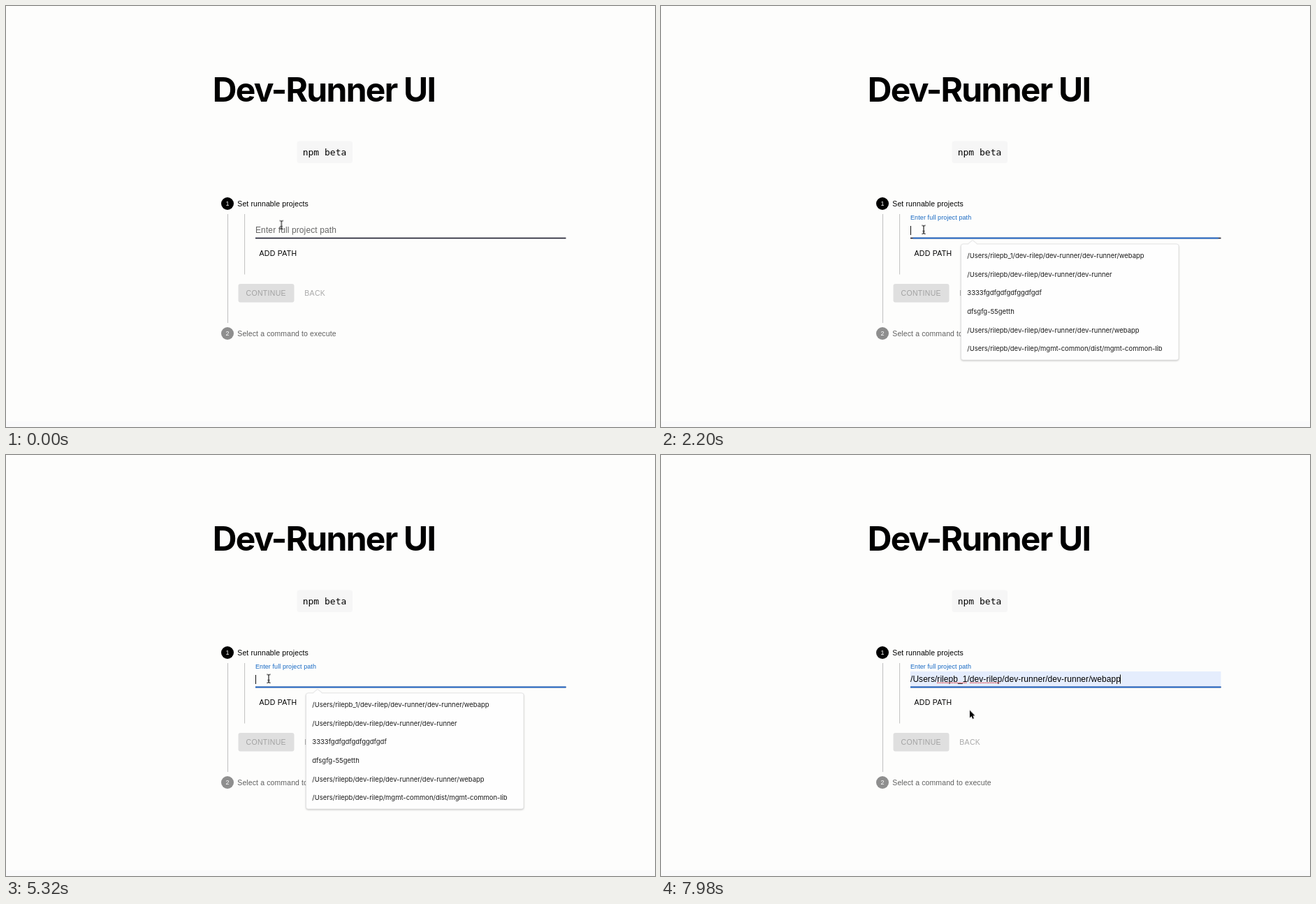
An HTML page that plays this animation: 929 px wide and 603 px high, repeating every 8000 ms.

```html
<!DOCTYPE html>
<html lang="en">
<head>
<meta charset="utf-8">
<title>Dev-Runner UI</title>
<style>
  html, body { margin: 0; width: 100%; height: 100%; overflow: hidden; background: #fdfdfc; }
  svg { display: block; width: 929px; height: 603px; }
  text { font-family: "Liberation Sans", Arial, sans-serif; white-space: pre; }

  .title { font: 700 48px Inter, sans-serif; letter-spacing: -.036em; text-anchor: middle; }
  .chip { font: 13px "DejaVu Sans Mono", monospace; text-anchor: middle; }
  .step { font-size: 10.5px; letter-spacing: .01071em; }
  .badge { font-size: 9px; fill: #fff; text-anchor: middle; }
  .button { font-size: 10.5px; letter-spacing: .02857em; }
  .label { font-size: 12px; letter-spacing: .00938em; }
  .value { font-size: 12px; letter-spacing: .05px; }
  .system text, text.system { font-family: Inter, sans-serif; font-size: 9.5px; letter-spacing: -.03px; fill: #1c1c1c; }
  text.preview { font-size: 9.3px; fill: #000; }
  .rail { stroke: #b9b9b9; stroke-width: .9; }
  .muted { fill: #a9a9a9; }
  .caret { fill: #111; }
  .typo { stroke: #e0444a; stroke-width: 1.3; stroke-dasharray: 1.5 .9; }

  /* One shared 8 s clock */
  .label, .focus, .pointer { animation: 8s linear infinite; }
  .popup, .hover, .blink, .filled, .done, .ibeam, .arrow { animation: 8s step-end infinite; }
  .label { animation-name: float; }
  .focus { animation-name: spread; transform-origin: 579.2px 0; }
  .pointer { animation-name: move; }
  .popup { animation-name: popup; }
  .hover { animation-name: hover; }
  .blink { animation-name: blink; }
  .filled { animation-name: filled; }
  .done { animation-name: done; }
  .ibeam { animation-name: ibeam; }
  .arrow { animation-name: arrow; }

  @keyframes float {
    0%, 22.249% { transform: translate(357px, 324.7px) scale(1); fill: #666; }
    22.25% { transform: translate(357px, 319.6px) scale(.933); fill: #626972;
             animation-timing-function: cubic-bezier(.131, .404, .423, 1); }
    28.725%, 100% { transform: translate(357px, 305.8px) scale(.75); fill: #1769c4; }
  }
  @keyframes spread {
    0%, 22.249% { transform: scaleX(0); }
    22.25% { transform: scaleX(.268); animation-timing-function: cubic-bezier(.131, .404, .423, 1); }
    28.725%, 100% { transform: scaleX(1); }
  }
  @keyframes move {
    0%, 2.125% { transform: translate(394.3px, 313.5px); animation-timing-function: ease-out; }
    5.375%, 8.74% { transform: translate(377px, 319.5px); }
    8.75%, 68.5% { transform: translate(376px, 320.3px); animation-timing-function: ease-in-out; }
    74.75% { transform: translate(424.8px, 355.6px); }
    77%, 78.25% { transform: translate(427px, 357.5px); animation-timing-function: ease-out; }
    82%, 92% { transform: translate(438.7px, 365.8px); animation-timing-function: ease-out; }
    94%, 100% { transform: translate(442px, 365.8px); }
  }
  @keyframes popup { 0% { opacity: 0 } 22.25% { opacity: 1 } 92.5%, 100% { opacity: 0 } }
  @keyframes hover { 0% { opacity: 0 } 79.25% { opacity: 1 } 92.5%, 100% { opacity: 0 } }
  @keyframes filled { 0% { opacity: 0 } 79.25%, 100% { opacity: 1 } }
  @keyframes done { 0% { opacity: 0 } 92.5%, 100% { opacity: 1 } }
  @keyframes blink {
    0% { opacity: 0 } 22.25% { opacity: 1 } 39.5% { opacity: 0 }
    57.25% { opacity: 1 } 74.5%, 100% { opacity: 0 }
  }
  @keyframes ibeam { 0% { opacity: 1 } 71.25%, 100% { opacity: 0 } }
  @keyframes arrow { 0% { opacity: 0 } 71.25%, 100% { opacity: 1 } }
</style>
</head>
<body>
<svg viewBox="0 0 929 603">
  <rect width="929" height="603" fill="#fdfdfc"/>
  <rect y="595" width="929" height="8" fill="#fafafb"/>

  <text class="title" x="455" y="137.3">Dev-Runner UI</text>
  <rect x="416.5" y="193.5" width="79.5" height="31.5" rx="3.5" fill="#f6f6f6"/>
  <text class="chip" x="456" y="214">npm beta</text>

  <circle cx="317" cy="283" r="9"/>
  <text class="badge" x="317" y="286.2">1</text>
  <text class="step" x="331.3" y="286.8">Set runnable projects</text>
  <path class="rail" d="M317.5 298V454M341.6 298V384.5"/>
  <circle cx="317" cy="469" r="9" fill="#8e8e8e"/>
  <text class="badge" x="317" y="472.2">2</text>
  <text class="step" x="331.3" y="472.7" fill="#606060">Select a command to execute</text>

  <rect class="filled" x="357" y="310" width="444.5" height="22" fill="#e5edfd"/>
  <rect x="357" y="331.7" width="444.5" height="1.6" fill="#1b1b2b"/>
  <rect class="focus" x="357" y="331.7" width="444.5" height="1.6" fill="#1967d2"/>
  <text class="label">Enter full project path</text>
  <rect class="caret blink" x="357" y="315" width="1" height="13"/>
  <text class="system preview hover" x="356.8" y="324.6">/Users/rilepb_1/dev-rilep/dev-runner/dev-runner/webapp</text>
  <g class="done">
    <text class="value" x="357" y="324.7">/Users/rilepb_1/dev-rilep/dev-runner/dev-runner/webapp</text>
    <path class="typo" d="M395 326.4H437.5M442 326.4H485.5"/>
    <rect class="caret" x="657" y="314.5" width="1" height="13"/>
  </g>

  <text class="button" x="362.5" y="357.8">ADD PATH</text>
  <rect x="332.5" y="398" width="80" height="26.5" rx="3" fill="#dfdfdf"/>
  <text class="button" x="343.6" y="414.9" fill="#a2a2a2">CONTINUE</text>
  <text class="button muted" x="427.3" y="414.9">BACK</text>

  <g class="popup">
    <path d="M432.5 341H439.5L446 335.5L452.5 341H738Q741 341 741 344V504Q741 507 738 507H432.5Q429.5 507 429.5 504V344Q429.5 341 432.5 341Z"
          fill="#fefefe" stroke="#dedede" stroke-width=".7" style="filter: drop-shadow(0 1px 1.3px rgba(0,0,0,.22))"/>
    <rect class="hover" x="429.8" y="344" width="311" height="26.5" fill="#dadada"/>
    <g class="system">
      <text x="438.3" y="360.8">/Users/rilepb_1/dev-rilep/dev-runner/dev-runner/webapp</text>
      <text x="438.3" y="387.5">/Users/rilepb/dev-rilep/dev-runner/dev-runner</text>
      <text x="438.3" y="414.2">3333fgdfgdfgdfggdfgdf</text>
      <text x="438.3" y="440.8">dfsgfg-55getth</text>
      <text x="438.3" y="467.5">/Users/rilepb/dev-rilep/dev-runner/dev-runner/webapp</text>
      <text x="438.3" y="494.2">/Users/rilepb/dev-rilep/mgmt-common/dist/mgmt-common-lib</text>
    </g>
  </g>

  <g class="pointer">
    <path class="ibeam" d="M-2.7-6Q0-6 0-4.5Q0-6 2.7-6M0-4.5V4.5M-2.7 6Q0 6 0 4.5Q0 6 2.7 6M-1.6 2.3H1.6"
          fill="none" stroke="#111" stroke-width="1.1"/>
    <path class="arrow" d="M0 0V10.4L2.4 8.2L4.1 12L5.9 11.2L4.3 7.5H7.4Z"
          stroke="#fff" stroke-width="1.4" stroke-linejoin="round" paint-order="stroke"
          style="filter: drop-shadow(0 .6px .7px rgba(0,0,0,.35))"/>
  </g>
</svg>
</body>
</html>
```
